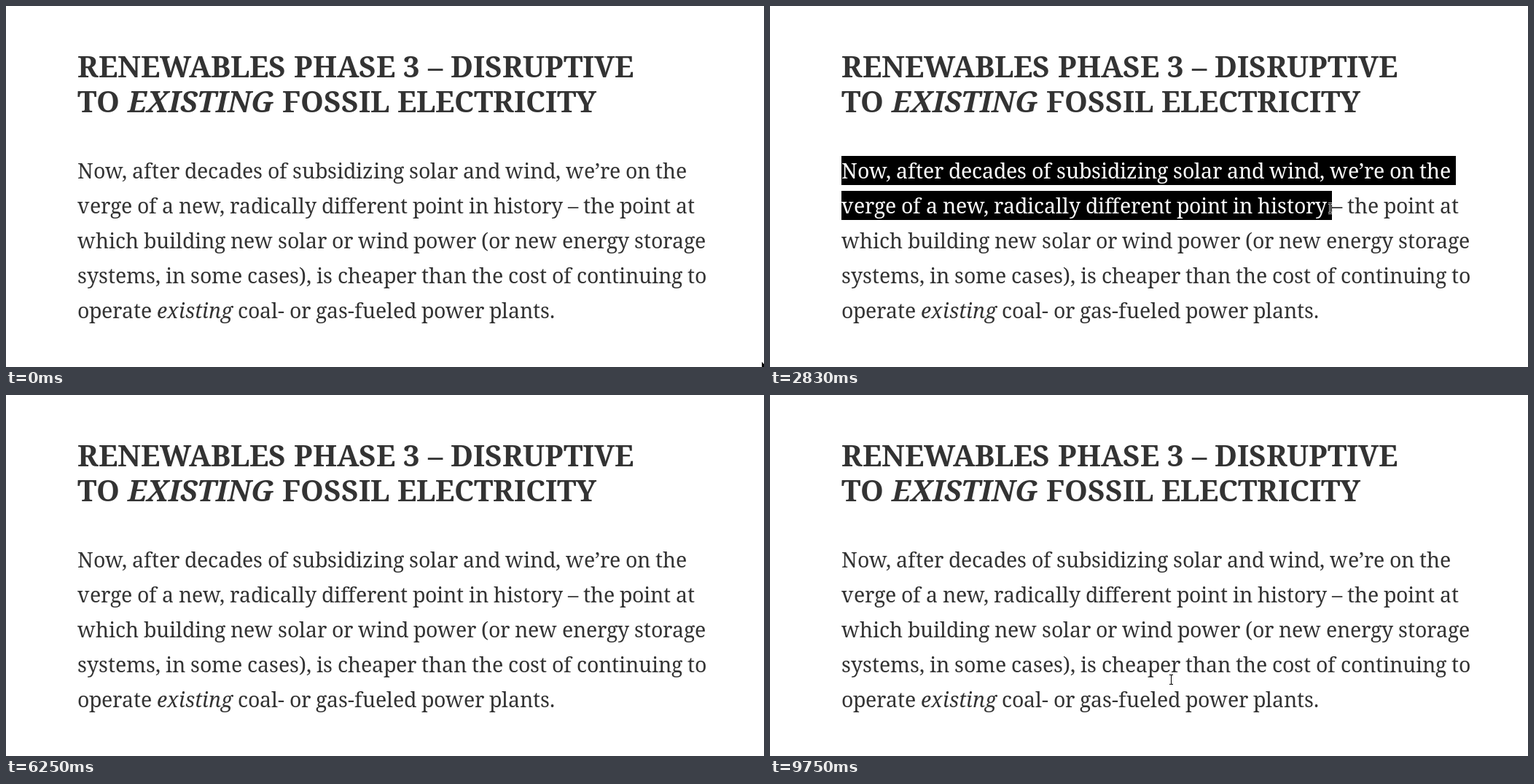
An HTML page with a canvas that plays this animation: 1040 by 496 pixels, repeating every 9.83 s.

```html
<!DOCTYPE html>
<html lang="en">
<head>
<meta charset="utf-8">
<title>Text selection</title>
<style>
  html, body { margin: 0; width: 100%; height: 100%; overflow: hidden; background: #fff; }
  canvas { display: block; }
</style>
</head>
<body>
<canvas id="stage" width="1040" height="496"></canvas>
<script>
const ctx = document.getElementById('stage').getContext('2d');
const W = 1040, H = 496, LOOP = 9830, TICK = 1000 / 12;
const LEFT = 98, TOP = 206, PITCH = 48, ROW_H = 40, ASCENT = 31;
const INK = '#333', ACTIVE = '#000', INACTIVE = '#b0b0b0';

const face = (size, weight, style) => `${style} ${weight} ${size}px "Noto Serif", serif`;

// Places the glyphs with whole-pixel advances; underscores mark italics.
function layout(text, size, weight) {
  const glyphs = [];
  const width = s => ctx.measureText(s).width;
  let x = LEFT;
  text.split('_').forEach((run, i) => {
    const font = face(size, weight, i % 2 ? 'italic' : 'normal');
    ctx.font = font;
    [...run].forEach((ch, j) => {
      const next = run[j + 1] || '';
      glyphs.push({ ch, x, font });
      x += Math.round(width(ch + next) - width(next));
    });
  });
  return { glyphs, stops: [...glyphs.map(g => g.x), x], end: x };
}

function drawLine(line, y) {
  for (const { ch, x, font } of line.glyphs) {
    ctx.font = font;
    ctx.fillText(ch, x, y);
  }
}

const title = ['RENEWABLES PHASE 3 – DISRUPTIVE', 'TO _EXISTING_ FOSSIL ELECTRICITY']
  .map(text => layout(text, 40.5, 'bold'));
const rows = [
  'Now, after decades of subsidizing solar and wind, we’re on the ',
  'verge of a new, radically different point in history – the point at ',
  'which building new solar or wind power (or new energy storage ',
  'systems, in some cases), is cheaper than the cost of continuing to ',
  'operate _existing_ coal- or gas-fueled power plants.'
].map(text => layout(text, 28.5, 'normal'));

const linear = u => u;
const out = u => 1 - (1 - u) ** 2;
const rush = u => u ** 2.4;
const smooth = u => u * u * (3 - 2 * u);
const drag = u => smooth(u ** 1.17);

// Pointer gestures, timed in ticks; the pointer rests between them.
const gestures = [];
const go = (from, to, x, y, ease = linear, bend = 1) =>
  gestures.push({ from, to, x, y, ease, bend });

go(0, 0, 1037, 489);
go(0, 12, 101, 227.5, out);
go(13, 25, 755, 278, drag, 1.5);
go(26, 28, 773, 278, out);
go(31, 34, 768.5, 278);
go(35, 39, 101.5, 341, smooth);
go(39, 41, 199.5, 325, out);
go(54, 58, 188.5, 317.5, out);
go(64, 65, 189, 341);
go(66, 70, 1100, 83, rush);
go(93, 94, 1034, -10);
go(94, 99, 101.5, 228, out);
go(99, 104, 552, 515);
go(105, 115, 884, 567);
go(115, 117, 550.5, 391);

function pointer(k) {
  let { x, y } = gestures[0];
  for (const g of gestures) {
    if (k <= g.from && g.from > 0) break;
    const p = k < g.to ? g.ease((k - g.from) / (g.to - g.from)) : 1;
    x += (g.x - x) * p;
    y += (g.y - y) * p ** g.bend;
    if (p < 1) break;
  }
  return { x, y };
}

// The selection trails the pointer a little in the first drag.
function selectionEnd(k) {
  if (k >= 14 && k < 75) return pointer(Math.min(k, 35) - 0.65);
  if (k >= 100 && k < 106) return pointer(Math.min(k, 104));
  return null;
}

const nearest = (stops, x) =>
  stops.reduce((a, b) => Math.abs(b - x) < Math.abs(a - x) ? b : a);

function drawSelection(end, color) {
  const last = Math.floor((end.y - TOP + 4) / PITCH);
  rows.slice(0, last + 1).forEach((row, i) => {
    const right = i < last ? row.end : nearest(row.stops, end.x);
    const y = TOP + i * PITCH;
    ctx.save();
    ctx.beginPath();
    ctx.rect(LEFT, y, right - LEFT, ROW_H);
    ctx.clip();
    ctx.fillStyle = color;
    ctx.fillRect(LEFT, y, W, ROW_H);
    ctx.fillStyle = '#fff';
    drawLine(row, y + ASCENT);
    ctx.restore();
  });
  // Top edge of the next block, just inside the view.
  if (last > rows.length) {
    ctx.fillStyle = color;
    ctx.fillRect(LEFT, H - 2, end.x - LEFT, 2);
  }
}

function halo(width) {
  ctx.strokeStyle = '#fff';
  ctx.lineWidth = width;
  ctx.stroke();
}

function drawBeam(x, y) {
  const cx = Math.floor(x) + 0.5, cy = Math.round(y);
  ctx.beginPath();
  for (const s of [-6.5, 6.5]) {
    ctx.moveTo(cx - 2.5, cy + s);
    ctx.lineTo(cx + 2.5, cy + s);
  }
  ctx.moveTo(cx, cy - 6.5);
  ctx.lineTo(cx, cy + 6.5);
  halo(2.4);
  ctx.strokeStyle = '#000';
  ctx.lineWidth = 1;
  ctx.stroke();
}

function drawArrow(x, y) {
  ctx.save();
  ctx.translate(x, y);
  const shape = new Path2D('M0 0V16L3.7 12.6L6 18L8.6 17L6.3 11.6L11.4 11.4Z');
  ctx.strokeStyle = '#fff';
  ctx.lineWidth = 1.5;
  ctx.stroke(shape);
  ctx.fillStyle = '#000';
  ctx.fill(shape);
  ctx.restore();
}

function drawPointer({ x, y }) {
  const overText = x > 97 && x < 970 && (y > 200 || (y > 58 && y < 154));
  (overText ? drawBeam : drawArrow)(x, y);
}

function draw(k) {
  ctx.fillStyle = '#fff';
  ctx.fillRect(0, 0, W, H);
  ctx.fillStyle = INK;
  title.forEach((line, i) => drawLine(line, 98 + i * PITCH));
  rows.forEach((line, i) => drawLine(line, TOP + ASCENT + i * PITCH));
  const end = selectionEnd(k);
  if (end) drawSelection(end, k >= 64 && k < 75 ? INACTIVE : ACTIVE);
  drawPointer(pointer(k));
}

function loop() {
  const t = performance.now() % LOOP;
  draw(Math.min(117, Math.floor((t + 4) / TICK)));
  requestAnimationFrame(loop);
}
loop();
</script>
</body>
</html>
```
